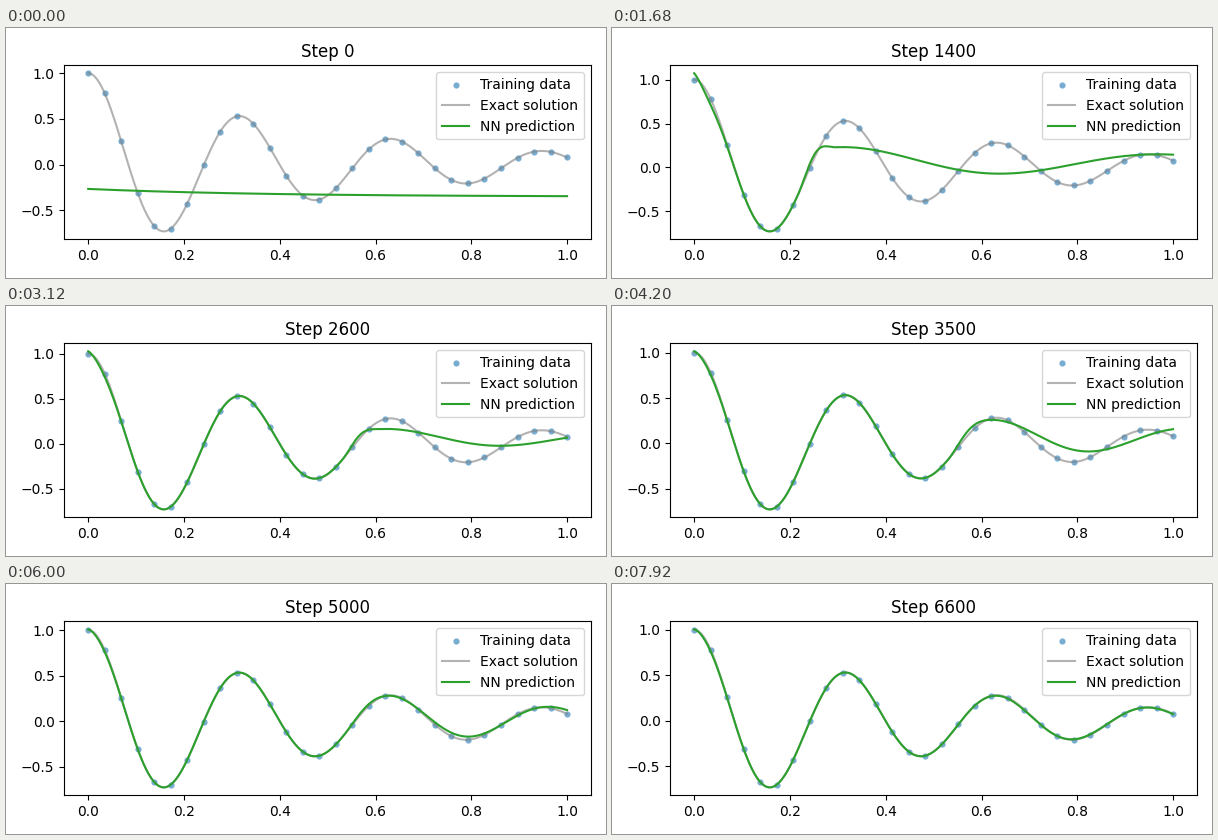
These frames come from a looping animation (600 px wide and 250 px high, 8000 ms). A matplotlib script:

```python
import numpy as np
import matplotlib.pyplot as plt
from matplotlib.animation import FuncAnimation

DELTA, OMEGA0 = 2.0, 20.0          # damping and natural frequency
TICK, FRAMES, HOLD = 40, 200, 3    # ms per frame, frames per loop, frames per step
EDGE = 0.08                        # width of the zone around the learning front
x = np.linspace(0, 1, 400)


def exact(t):
    w = np.sqrt(OMEGA0**2 - DELTA**2)
    phi = np.arctan(-DELTA / w)
    return np.exp(-DELTA * t) * np.cos(phi + w * t) / np.cos(phi)


def ramp(v, start, end):
    return np.clip((v - start) / (end - start), 0, 1)


def ease(v, start, end):
    p = ramp(v, start, end)
    return p * p * (3 - 2 * p)


def predict(step):
    """Wave learned from left to right; past the front it is slow and weak."""
    front = 0.02 + 0.51 * ramp(step, 700, 2520)
    gain = 1 - 0.67 * np.exp(-0.00085 * max(step - 2500, 0))
    slow = 0.52 * (1 - ramp(step, 1400, 5700))**1.3
    lift = 0.057 * (1 - ease(step, 3500, 5900))
    lead = 0.06 * gain * (1 - gain)

    past = ease(x, front, front + EDGE)
    warped = x + lead * past - slow * np.maximum(x - front - EDGE, 0)
    wave = exact(warped) * (1 - (1 - gain) * past) + lift * past

    # overshoot at the left end that fades with training
    decay = np.exp(-max(step - 1400, 0) / 1100)
    head = (0.006 + 0.069 * decay - (1.4 + 5 * decay) * x) * np.exp(-(x / 0.04)**2)
    wave += head * ease(step, 700, 1400)

    untrained = -0.35 + 0.085 * np.exp(-2.7 * x)
    return untrained + (wave - untrained) * ease(step, 0, 700)


fig, ax = plt.subplots(figsize=(6, 2.5), dpi=100)
truth = exact(x)
samples = np.linspace(0, 1, 30)
ax.scatter(samples, exact(samples), s=20, color="tab:blue", alpha=0.6,
           linewidths=0, label="Training data")
ax.plot(x, truth, color="grey", alpha=0.6, label="Exact solution")
line, = ax.plot(x, predict(0), color="tab:green", label="NN prediction")
title = ax.set_title("Step 0")
ax.set_xlim(-0.05, 1.05)
ax.legend(loc="upper right")


def update(frame):
    step = frame // HOLD * 100
    y = predict(step)
    line.set_ydata(y)
    title.set_text(f"Step {step}")
    low, high = min(y.min(), truth.min()), max(y.max(), truth.max())
    pad = 0.05 * (high - low)
    ax.set_ylim(low - pad, high + pad)
    return line, title


update(0)
fig.tight_layout()
anim = FuncAnimation(fig, update, frames=FRAMES, interval=TICK,
                     init_func=lambda: update(0), repeat=True, repeat_delay=0)
plt.show()
```
